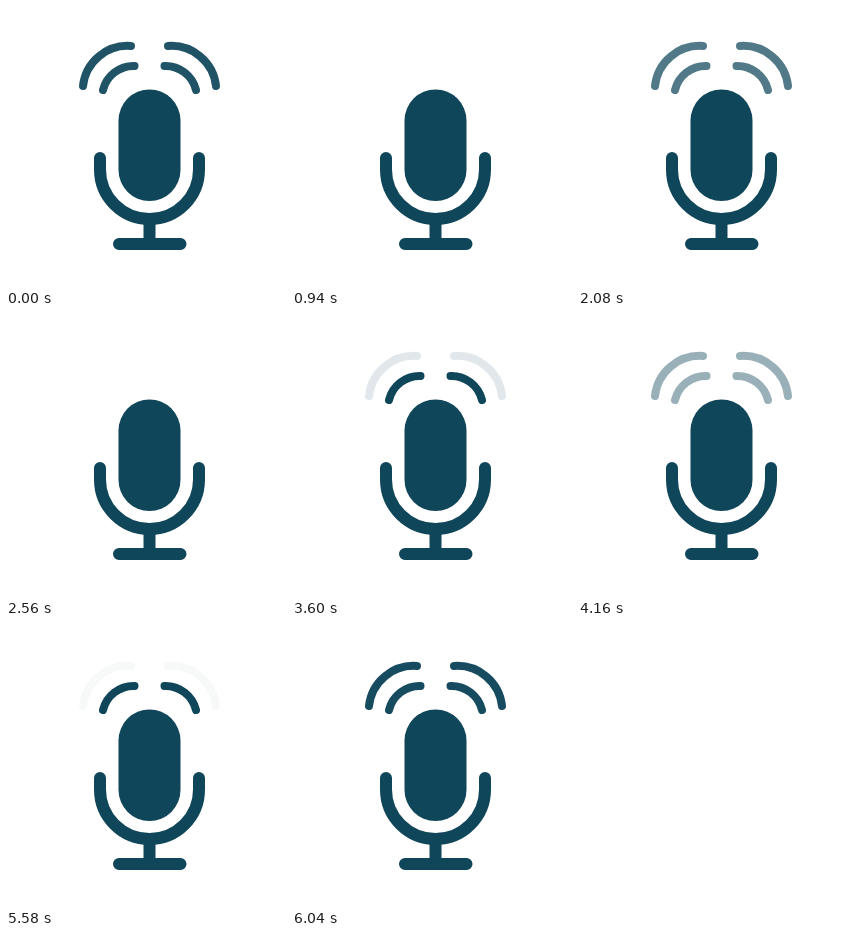
Animation, 280 px wide and 282 px high, one loop 6.06 s. Source, as an HTML page:

```html
<!DOCTYPE html>
<html lang="en">
<head>
<meta charset="utf-8">
<title>Microphone</title>
<style>
  html, body {
    margin: 0;
    width: 100%;
    height: 100%;
    overflow: hidden;
    background: #fff;
  }
  svg {
    display: block;
    width: 280px;
    height: 282px;
    --ink: #10465a;
    fill: none;
    stroke: var(--ink);
    stroke-linecap: round;
  }
  .solid { fill: var(--ink); stroke: none; }
  .stand { stroke-width: 12; }
  .wave {
    stroke-width: 8;
    animation: 2020ms ease-in-out -60ms infinite;
  }
  .inner { animation-name: inner; }
  .outer { animation-name: outer; }
  @keyframes inner {
    0% { opacity: 1; }
    16.5%, 52.5% { opacity: 0; }
    69%, 100% { opacity: 1; }
  }
  @keyframes outer {
    0% { opacity: 1; }
    16.5%, 77.2% { opacity: 0; }
    93.7%, 100% { opacity: 1; }
  }
</style>
</head>
<body>
<svg viewBox="0 0 280 282">
  <rect class="solid" x="112.5" y="83.5" width="62" height="111.5" rx="31"/>
  <g class="stand">
    <path d="M94 152V163.5A49.5 49.5 0 0 0 193 163.5V152"/>
    <path d="M143.5 213V238M113 238H174.5"/>
  </g>
  <g class="wave inner">
    <path id="near" d="M97 84A31.5 31.5 0 0 1 128.5 60"/>
    <use href="#near" transform="matrix(-1 0 0 1 287 0)"/>
  </g>
  <g class="wave outer">
    <path id="far" d="M77 80A45 45 0 0 1 125 40"/>
    <use href="#far" transform="matrix(-1 0 0 1 287 0)"/>
  </g>
</svg>
</body>
</html>
```
